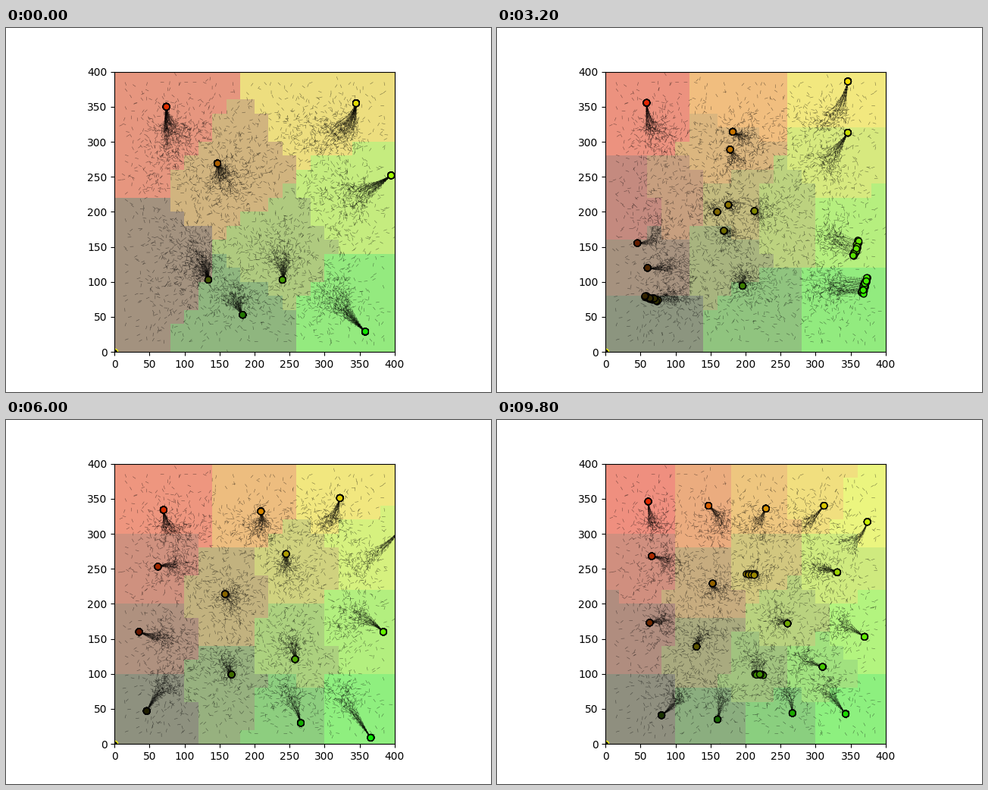
These frames come from a looping animation (640x480 px, 10 s). A matplotlib script:

```python
import numpy as np
import matplotlib.pyplot as plt
from matplotlib.animation import FuncAnimation
from matplotlib.collections import LineCollection

SIZE, N, STEPS, FRAMES = 400, 20, 24, 50
CELL, MIDDLE = SIZE / N, SIZE / 2

rng = np.random.default_rng(7)
gx, gy = np.meshgrid(np.arange(N) + 0.5, np.arange(N) + 0.5)
cells = CELL * np.column_stack([gx.ravel(), gy.ravel()])
starts = np.clip(cells + rng.uniform(-9, 9, cells.shape), 15, 385)
along = rng.uniform(-1, 1, (len(cells), 1))
around = rng.uniform(-1, 1, cells.shape)
shake = rng.normal(0, 1, (STEPS + 1,) + cells.shape)

keys = {}


def key(frame, *points):
    """Attractors (x, y) at one moment, some with a spread (dx, dy)."""
    keys[frame] = np.array([(p + (0, 0))[:4] for p in points], float)


key(0, (74, 350), (147, 269), (345, 355), (395, 252), (134, 103),
    (240, 103), (183, 53), (358, 29))
key(11, (105, 355), (153, 282), (353, 373), (362, 341), (175, 197),
    (61, 119), (224, 53), (71, 39, 17, -7), (355, 108, 6, 20))
key(22, (3, 356), (216, 353), (208, 297), (338, 402), (327, 279),
    (258, 206), (362, 195), (27, 199), (141, 203), (176, 225),
    (162, 144), (59, 121), (388, 78))
key(30, (70, 334), (209, 332), (322, 351), (408, 306), (62, 253),
    (245, 271), (158, 214), (35, 160), (384, 160), (258, 121),
    (167, 99), (266, 30), (366, 9), (46, 47))
key(35, (61, 367), (170, 389), (318, 339), (380, 270), (108, 270),
    (240, 267), (291, 186), (40, 159), (215, 122, 7, 0), (121, 70),
    (66, 11), (245, 104), (266, 35), (386, 34), (383, 115))
key(42, (81, 318), (156, 391), (282, 348), (361, 325), (327, 224),
    (139, 258), (278, 274), (62, 188), (250, 178), (186, 105, -5, 25),
    (331, 129), (285, 118), (231, 90), (345, 42), (263, 44), (147, 48),
    (107, 82), (77, 35))
key(49, (61, 346), (147, 340), (229, 336), (312, 340), (374, 317),
    (66, 268), (153, 229), (207, 242, 7, 0), (331, 245), (260, 172),
    (63, 173), (130, 139), (370, 153), (310, 110), (219, 99, 6, -1),
    (80, 41), (160, 35), (267, 44), (343, 43))


def gaps(a, b):
    return np.linalg.norm(a[:, None, :2] - b[None, :, :2], axis=2)


def match(a, b):
    """Pair points one to one; leftovers split from or merge into the nearest."""
    cost = gaps(a, b)
    pairs = []
    for flat in np.argsort(cost, axis=None):
        i, j = np.unravel_index(flat, cost.shape)
        if cost[i, j] < 110 and all(i != p and j != q for p, q in pairs):
            pairs.append((i, j))
    left = set(range(len(a))) - {p for p, _ in pairs}
    right = set(range(len(b))) - {q for _, q in pairs}
    pairs += [(i, cost[i].argmin()) for i in sorted(left)]
    pairs += [(cost[:, j].argmin(), j) for j in sorted(right)]
    i, j = np.array(pairs).T
    return a[i], b[j]


times = sorted(keys)
spans = [(t0, t1) + match(keys[t0], keys[t1]) for t0, t1 in zip(times, times[1:])]


def attractors(frame):
    if frame in keys:
        return keys[frame]
    for t0, t1, a, b in spans:
        if t0 < frame < t1:
            return a + (b - a) * (frame - t0) / (t1 - t0)


def basins(points, rounds=3):
    """Nearest-site cells, evened out by moving each site to its basin's mean."""
    sites = points[:, :2].copy()
    for _ in range(rounds + 1):
        label = gaps(cells, sites).argmin(axis=1)
        for k in np.unique(label):
            sites[k] = cells[label == k].mean(axis=0)
    return label, sites[label]


def tint(p):
    rgb = np.zeros((len(p), 3))
    rgb[:, 0], rgb[:, 1] = p[:, 1] / SIZE, p[:, 0] / SIZE
    return np.clip(rgb, 0, 1)


def rotate(v, angle):
    c, s = np.cos(angle), np.sin(angle)
    return np.column_stack([c * v[:, 0] - s * v[:, 1], s * v[:, 0] + c * v[:, 1]])


u = (1 - (1 - np.linspace(0, 1, STEPS + 1)) ** 2)[:, None, None]
bezier = ((1 - u) ** 3, 3 * u * (1 - u) ** 2, 3 * u ** 2 * (1 - u), u ** 3)
noise = 220 * u * (1 - u) ** 3 * shake


def state(frame):
    points = attractors(frame)
    label, mean = basins(points)
    goal, spread = points[label, :2], points[label, 2:]
    width = 0.2 + 0.15 * np.linalg.norm(spread, axis=1, keepdims=True)
    ends = goal + spread * along + width * around

    # wander inward first, then arrive in a bundle from the middle
    swing = 0.7 * np.sin(goal[:, 0] / 30 + goal[:, 1] / 40)
    near = starts + 0.35 * (MIDDLE - starts)
    bend = ends + rotate(0.3 * (MIDDLE - goal), swing) + 0.15 * (starts - goal)
    path = sum(w * p for w, p in zip(bezier, (starts, near, bend, ends))) + noise

    step = np.diff(path, axis=0)
    length = np.linalg.norm(step, axis=2, keepdims=True) + 1e-9
    tip = path[:-1] + step * np.minimum(0.7, 5 / length)
    dashes = np.stack([path[:-1], tip], axis=2).reshape(-1, 2, 2)
    return 0.5 + 0.5 * tint(mean).reshape(N, N, 3), dashes, ends


fig, ax = plt.subplots(figsize=(6.4, 4.8), dpi=100)
grid, dashes, ends = state(0)
image = ax.imshow(grid, origin="lower", extent=(0, SIZE, 0, SIZE),
                  interpolation="nearest")
lines = LineCollection(dashes, colors="black", linewidths=0.4, alpha=0.5, zorder=2)
ax.add_collection(lines)
ax.scatter([0], [0], s=36, c="black", edgecolors="yellow", zorder=2.1)
dots = ax.scatter(ends[:, 0], ends[:, 1], s=36, c=tint(ends),
                  edgecolors="black", linewidths=1, zorder=2.2)
ax.set(xlim=(0, SIZE), ylim=(0, SIZE))
ax.set_xticks(range(0, SIZE + 1, 50))
ax.set_yticks(range(0, SIZE + 1, 50))


def update(frame):
    grid, dashes, ends = state(frame)
    image.set_data(grid)
    lines.set_segments(dashes)
    dots.set_offsets(ends)
    dots.set_facecolors(tint(ends))
    return image, lines, dots


anim = FuncAnimation(fig, update, frames=FRAMES, interval=200,
                     repeat=True, repeat_delay=0, blit=False)
plt.show()
```
